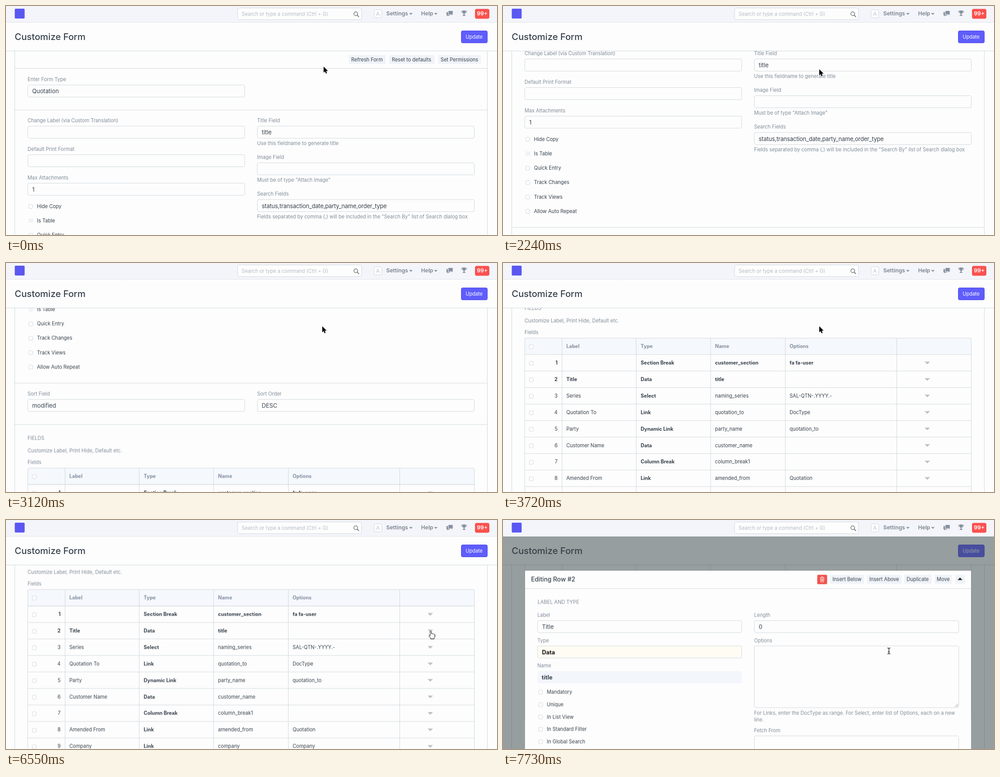
Animation, 1093 px wide and 512 px high, one loop 8 s. Source, as an HTML page:

```html
<!DOCTYPE html>
<html lang="en">
<head>
<meta charset="utf-8">
<title>Customize Form</title>
<style>
html, body { margin: 0; width: 100%; height: 100%; overflow: hidden; background: #fdfdfd; }
svg { display: block; width: 1093px; height: 512px; }
text { font: 400 11.04px Inter, "Open Sans", sans-serif; fill: #36414c; white-space: pre; }
.label { fill: #7f8c99; }
.value { font-size: 12.88px; }
.bold { font-weight: 700; }
.head { font-weight: 700; fill: #8390a0; }
.tight { letter-spacing: -.15px; }
.nav { font-size: 12.1px; font-weight: 600; fill: #79838f; }
.title { font-size: 20.24px; font-weight: 500; }
.row-title { font-size: 13.8px; font-weight: 500; }
.line { fill: none; stroke: #d1d8dd; }
.field { fill: #fdfdfd; stroke: #d1d8dd; }
.chip { fill: #f0f3f8; }
.grey { fill: #8791a0; }

.anim { animation: 8s step-end infinite; }
.scroll { animation-name: scroll; }
#freeze { animation-name: freeze; }
#modal { animation-name: modal; }
#cursor { animation-name: move; }
#arrow { animation-name: arrow; }
#hand { animation-name: hand; }
#beam { animation-name: beam; }

@keyframes scroll {
  0% { transform: translate(0px, 0px); }
  22.5% { transform: translate(0px, -5.5px); }
  24.25% { transform: translate(0px, -42px); }
  26.125% { transform: translate(0px, -102px); }
  28% { transform: translate(0px, -150px); }
  29.75% { transform: translate(0px, -181px); }
  31.625% { transform: translate(0px, -200px); }
  33.5% { transform: translate(0px, -211px); }
  35.375% { transform: translate(0px, -216px); }
  37.125% { transform: translate(0px, -268px); }
  39% { transform: translate(0px, -376.5px); }
  40.875% { transform: translate(0px, -490px); }
  42.75% { transform: translate(0px, -577px); }
  44.625% { transform: translate(0px, -634px); }
  46.5% { transform: translate(0px, -667px); }
  48.375% { transform: translate(0px, -679.5px); }
  85.5% { transform: translate(0px, -735.5px); }
  87.375% { transform: translate(0px, -783px); }
  89.25%, 100% { transform: translate(0px, -795.5px); }
}
@keyframes freeze {
  0% { opacity: 0; }
  85.5% { opacity: .34; }
  87.375%, 100% { opacity: .5; }
}
@keyframes modal {
  0% { opacity: 0; }
  85.5%, 100% { opacity: 1; }
}
@keyframes move {
  0% { transform: translate(707px, 135.5px); }
  1.875% { transform: translate(705px, 139.5px); }
  3.75% { transform: translate(704px, 141.5px); }
  54% { transform: translate(709px, 143px); }
  55.875% { transform: translate(782px, 170px); }
  57.75% { transform: translate(898px, 221px); }
  59.5% { transform: translate(973px, 250px); }
  61.375% { transform: translate(989px, 251.5px); }
  63.25% { transform: translate(958px, 250px); }
  65% { transform: translate(945.5px, 248.5px); }
  94.75% { transform: translate(902px, 273px); }
  96.625%, 100% { transform: translate(858.5px, 292.5px); }
}
@keyframes arrow {
  0% { opacity: 1; }
  81.875% { opacity: 0; }
  85.5% { opacity: 1; }
  87.375%, 100% { opacity: 0; }
}
@keyframes hand {
  0% { opacity: 0; }
  81.875% { opacity: 1; }
  85.5%, 100% { opacity: 0; }
}
@keyframes beam {
  0% { opacity: 0; }
  87.375%, 100% { opacity: 1; }
}
</style>
</head>
<body>
<svg viewBox="0 0 1093 512">
  <rect width="1093" height="512" fill="#fdfdfd"/>
  <g id="form" class="anim scroll"></g>
  <path class="line" d="M19.5 101V512M1071.5 101V512"/>
  <g id="pagehead"></g>
  <rect id="freeze" class="anim" y="37" width="1093" height="475" fill="#334143"/>
  <g id="modal" class="anim"><g id="editor" class="anim scroll"></g></g>
  <g id="navbar"></g>
  <g id="cursor" class="anim">
    <path id="arrow" class="anim" d="M0 0V13.6L3.1 10.7L5.1 15.4L7.5 14.4L5.5 9.8H9.8Z" stroke="#fff" stroke-width="1.1" paint-order="stroke"/>
    <path id="hand" class="anim" d="M-1.2 7.8V.8Q.2 -1 1.6 .8V5.6Q3.3 4.7 4.3 6Q6 5.5 6.8 6.8Q9 6.5 9 8.8V12Q8.6 14 7.6 15.2V17H-.4V15.4L-3.8 11Q-4.6 9 -2.6 9.2L-1.2 10.4Z" fill="#fff" stroke="#000" stroke-linejoin="round"/>
    <g id="beam" class="anim" fill="none" stroke-linecap="round">
      <path id="stem" d="M-2.3 -6.3Q.5 -6.3 .5 -4V4.5Q.5 6.8 -2.3 6.8M3.3 -6.3Q.5 -6.3 .5 -4M3.3 6.8Q.5 6.8 .5 4.5M-1 1.8H2" stroke="#fff" stroke-width="2.2"/>
      <use href="#stem" style="stroke:#000"/>
      <path d="M-2.3 -6.3Q.5 -6.3 .5 -4V4.5Q.5 6.8 -2.3 6.8M3.3 -6.3Q.5 -6.3 .5 -4M3.3 6.8Q.5 6.8 .5 4.5M-1 1.8H2" stroke="#111" stroke-width="1.2"/>
    </g>
  </g>
</svg>
<script>
const put = (id, ...parts) => { document.getElementById(id).innerHTML = parts.flat(9).join(''); };
const text = (x, y, s, cls = '', extra = '') => `<text x="${x}" y="${y}" class="${cls}" ${extra}>${s}</text>`;
const label = (x, y, s) => text(x, y, s, 'label');
const box = (x, y, w, h, attrs = 'class="field"', r = 3.5) =>
  `<rect x="${x}" y="${y}" width="${w}" height="${h}" rx="${r}" ${attrs}/>`;
const path = (d, attrs = 'class="line"') => `<path d="${d}" ${attrs}/>`;
const tick = (x, y) => box(x, y, 9, 9, 'class="field"', 2);
const chip = (x, y, w, s, tx) => [box(x, y, w, 20, 'class="chip"', 2), text(tx, y + 13.7, s)];
const caret = (x, y, w, h, attrs) => path(`M${x - w / 2} ${y}h${w}l${-w / 2} ${h}Z`, attrs);

// Label, input below it, optional value and hint.
const control = (x, y, w, name, value = '', hint = '', cls = 'value') => [
  label(x, y, name),
  box(x + .5, y + 8.5, w, 27),
  text(x + 10.2, y + 27.4, value, cls),
  label(x, y + 51, hint)
];

const checks = ['Hide Copy', 'Is Table', 'Quick Entry', 'Track Changes', 'Track Views', 'Allow Auto Repeat'];
const columns = [131.5, 296.5, 462, 628.5, 876.5];
const starts = [141, 306.6, 472, 638];
const rows = [
  ['', 'Section Break', 'customer_section', 'fa fa-user'],
  ['Title', 'Data', 'title', ''],
  ['Series', 'Select', 'naming_series', 'SAL-QTN-.YYYY.-'],
  ['Quotation To', 'Link', 'quotation_to', 'DocType'],
  ['Party', 'Dynamic Link', 'party_name', 'quotation_to'],
  ['Customer Name', 'Data', 'customer_name', ''],
  ['', 'Column Break', 'column_break1', ''],
  ['Amended From', 'Link', 'amended_from', 'Quotation'],
  ['Company', 'Link', 'company', 'Company']
];
const tableTop = 835, rowsTop = 871.7, rowStep = 36.9;

const row = (cells, i) => {
  const y = rowsTop + i * rowStep, base = y + 22.3, strong = i < 2 ? 'bold' : '';
  return [
    path(`M48.5 ${y}H1042.5`),
    tick(58.5, y + 15),
    text(121.5, base, i + 1, strong, 'text-anchor="end"'),
    cells.map((s, c) => text(starts[c], base, s, c === 1 ? 'bold' : strong)),
    caret(944.5, y + 15.8, 12, 6, 'fill="#bcc1c6"')
  ];
};

put('form',
  chip(763, 109.8, 82, 'Refresh Form', 768.6),
  chip(853, 109.8, 101, 'Reset to defaults', 859),
  chip(962, 109.8, 95, 'Set Permissions', 967.6),
  [139.5, 232.5, 645, 737.5].map(y => path(`M20 ${y}H1071`)),
  control(48, 168, 483, 'Enter Form Type', 'Quotation'),
  control(48, 260, 483, 'Change Label (via Custom Translation)'),
  control(48, 324, 483, 'Default Print Format'),
  control(48, 387.7, 483, 'Max Attachments', '1'),
  control(559, 260, 483, 'Title Field', 'title', 'Use this fieldname to generate title'),
  control(559, 342, 483, 'Image Field', '', 'Must be of type "Attach Image"'),
  control(559, 424.3, 483, 'Search Fields', 'status,transaction_date,party_name,order_type',
    'Fields separated by comma (,) will be included in the "Search By" list of Search dialog box', 'value tight'),
  checks.map((s, i) => {
    const y = 447.5 + i * 32.25;
    return [
      i === 1 ? box(50, y - 5, 11, 10, 'fill="#f2f3f7"', 2) : tick(50.5, y - 4),
      text(69, y + 4, s)
    ];
  }),
  control(48, 673, 483, 'Sort Field', 'modified'),
  control(559, 673, 483, 'Sort Order', 'DESC'),
  label(48, 772, 'FIELDS'),
  label(48, 799.5, 'Customize Label, Print Hide, Default etc.'),
  label(48, 826, 'Fields'),
  path(`M48.5 ${rowsTop}V${tableTop + 3}q0 -3 3 -3H1039.5q3 0 3 3V${rowsTop}Z`, 'fill="#f5f8fc"'),
  path(`M48.5 1240V${tableTop + 3}q0 -3 3 -3H1039.5q3 0 3 3V1240`),
  columns.map(x => path(`M${x} ${tableTop}V1240`)),
  tick(58.5, tableTop + 14.5),
  ['Label', 'Type', 'Name', 'Options'].map((s, i) => text(starts[i], tableTop + 22, s, 'head')),
  rows.map(row)
);

put('pagehead',
  '<rect y="36" width="1093" height="65" fill="#fdfdfd"/>',
  path('M0 100.5H1093'),
  text(19.3, 76.3, 'Customize Form', 'title'),
  box(1013.5, 55.5, 58, 27, 'fill="#5f5dfb" stroke="#4d49ea"', 3),
  text(1023.2, 73, 'Update', '', 'style="fill:#fff"')
);

put('editor', '<g transform="translate(0 795.5)">',
  '<rect x="49" y="113" width="993" height="460" fill="#fdfdfd"/>',
  path('M49 153.5H1042'),
  text(62.5, 137.8, 'Editing Row #2', 'row-title'),
  box(699.5, 122.5, 22, 21, 'fill="#f0524f"', 2.5),
  path('M705.5 129h10M708.8 128.5v-1.6h3.4v1.6M706.6 129l.6 9.5h6.6l.6 -9.5M709 131v5.5M710.5 131v5.5M712 131v5.5',
    'fill="none" stroke="#fff" stroke-width=".9"'),
  chip(728, 122.8, 76, 'Insert Below', 733.4),
  chip(810, 122.8, 77, 'Insert Above', 815.5),
  chip(893, 122.8, 61, 'Duplicate', 898.5),
  chip(961, 122.8, 38, 'Move', 965.6),
  box(1007, 122.8, 21, 20, 'class="chip"', 2),
  caret(1017.4, 134.2, 11, -5.5, 'fill="#1c2126"'),
  label(77, 187.7, 'LABEL AND TYPE'),
  control(76.5, 216.5, 454.5, 'Label', 'Title'),
  label(76.5, 273, 'Type'),
  box(77, 281.5, 454.5, 27, 'fill="#fffdf3" stroke="#d1d8dd"'),
  text(86.8, 300.2, 'Data', 'value bold', 'style="fill:#111"'),
  label(76.5, 329, 'Name'),
  box(77, 338, 455, 27, 'fill="#f3f6fb"', 2),
  text(86, 356.2, 'title', 'value bold'),
  ['Mandatory', 'Unique', 'In List View', 'In Standard Filter', 'In Global Search'].map((s, i) => {
    const y = 384.7 + i * 27.7;
    return [tick(79, y - 4.2), text(97.6, y + 4, s)];
  }),
  control(559, 216.5, 455, 'Length', '0'),
  label(559, 273, 'Options'),
  box(559.5, 281.5, 455, 138),
  path('M1006 418L1013 411M1010 418L1013 415', 'fill="none" stroke="#777" stroke-width=".9"'),
  label(559, 435, 'For Links, enter the DocType as range. For Select, enter list of Options, each on a new'),
  label(559, 450.8, 'line.'),
  label(559, 474, 'Fetch From'),
  box(559.5, 482.5, 455, 138),
  '</g>');

put('navbar',
  '<rect width="1093" height="37" fill="#f4f5fa"/>',
  path('M0 36.5H1093', 'stroke="#dfe3ea"'),
  box(19.5, 6, 22, 22, 'fill="#5b58f2"', 2),
  box(515.5, 4.5, 276, 26),
  text(524.6, 22, 'Search or type a command (Ctrl + G)', '', 'style="fill:#b3bbc5"'),
  '<circle cx="778.6" cy="17.4" r="4.2" fill="none" stroke="#5c6269" stroke-width="1.3"/>',
  path('M781.7 20.5L785.2 24', 'stroke="#5c6269" stroke-width="1.7" stroke-linecap="round"'),
  box(819.5, 8.5, 17, 18, 'class="field"', 3),
  text(828, 21.6, 'A', '', 'text-anchor="middle" style="fill:#bcc3cb;font-size:12px"'),
  text(846.6, 21.4, 'Settings', 'nav'),
  caret(901.3, 15.8, 8, 4, 'class="grey"'),
  text(924, 21.4, 'Help', 'nav'),
  caret(956.8, 15.8, 8, 4, 'class="grey"'),
  path('M985 11h9.5v7.5h-1v2.5l-2.6 -2.5h-5.9Z', 'class="grey"'),
  path('M980.5 13.5h3.5v6h5v1.5h-3.5l-2.8 2.5v-2.5h-2.2Z', 'class="grey"'),
  path('M1016 10h7.5v3.5q-.3 3.2 -2.8 4v2.5h2v2h-6v-2h2v-2.5q-2.4 -.8 -2.7 -4Z', 'class="grey"'),
  path('M1016 11.7h-2.3q.2 3.4 2.8 3.8M1023.5 11.7h2.3q-.2 3.4 -2.8 3.8', 'fill="none" stroke="#8791a0"'),
  box(1044, 6.5, 32, 22, 'fill="#f9524f"', 4),
  text(1060, 21.4, '99+', 'nav', 'text-anchor="middle" style="fill:#fff"')
);
</script>
</body>
</html>
```
